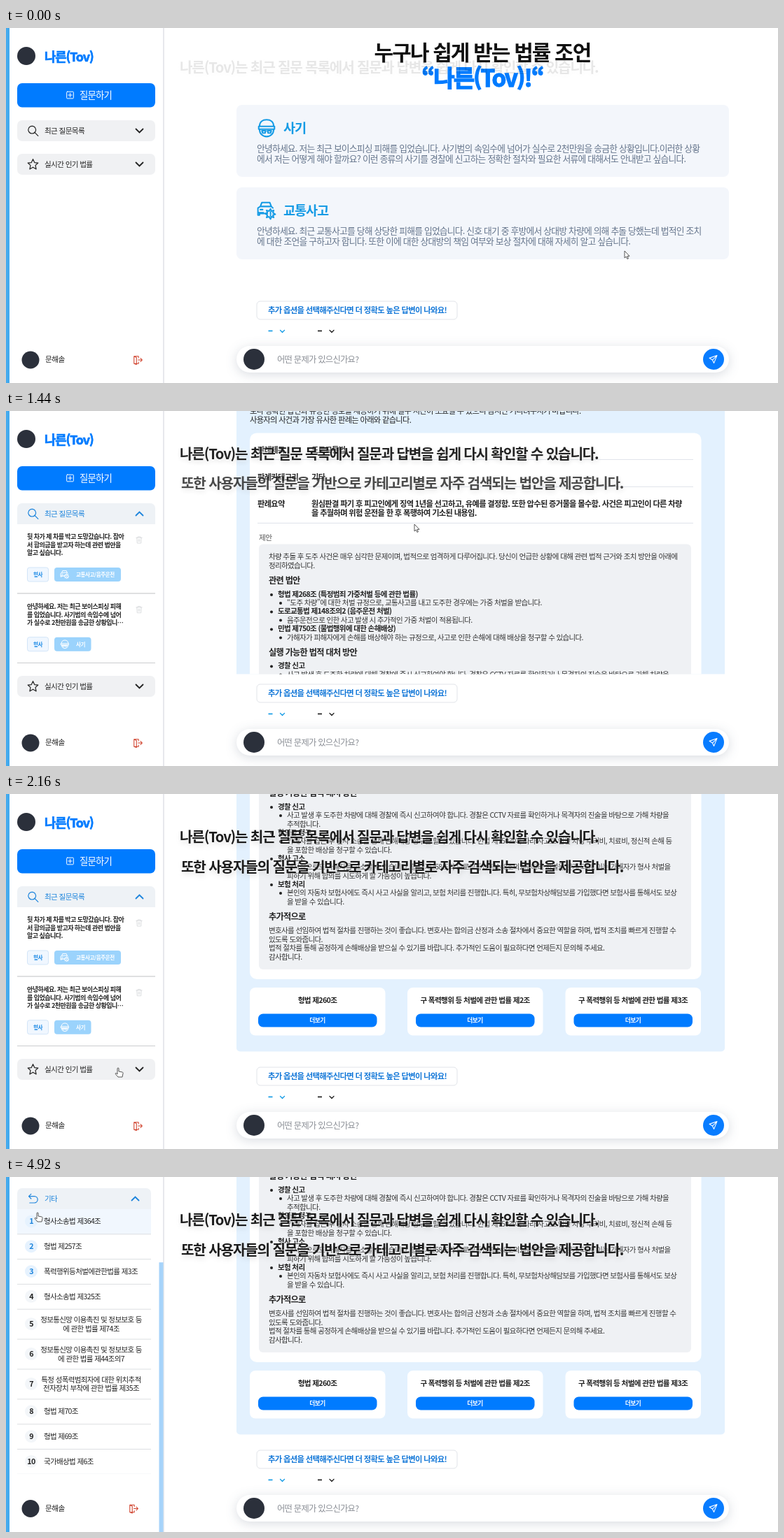
Recreate the animation shown at these times as an HTML page. Size 1102 by 508 pixels, loop 4960 ms.

```html
<!DOCTYPE html>
<html lang="ko">
<head>
<meta charset="utf-8">
<style>
html, body { margin: 0; width: 100%; height: 100%; overflow: hidden; background: #fff; }
body > svg { display: block; font-family: "Noto Sans CJK KR", "Noto Sans KR", "Noto Sans CJK", sans-serif; }
text { letter-spacing: -.06em; white-space: pre; }
.brand { stroke: #007bff; stroke-width: .04em; }
.note { filter: drop-shadow(0 0 2px rgba(255,255,255,.9)) drop-shadow(1px 3px 3px rgba(0,0,0,.1)); }
.pill { filter: drop-shadow(0 3px 8px rgba(30,50,80,.17)); }
</style>
</head>
<body>
<svg id="stage" width="1102" height="508" viewBox="0 0 1102 508"></svg>
<script>
const LOOP = 4960;
const BLUE = '#007bff', SKY = '#159be5', INK = '#222', MASCOT = '#2b303b';
const BRAND = '나른(Tov)', USER = '문해솔';

// y is the visual middle of the line
const text = (x, y, s, size, fill = INK, weight = 400, anchor = 'start') =>
  `<text x="${x}" y="${y + size * .38}" font-size="${size}" fill="${fill}" font-weight="${weight}" text-anchor="${anchor}">${s}</text>`;
const lines = (x, y, step, list, ...rest) => list.map((s, i) => text(x, y + i * step, s, ...rest)).join('');
const brand = (...args) => `<g class="brand" font-size="${args[3]}">${text(...args)}</g>`;
const rect = (x, y, w, h, r, fill, extra = '') =>
  `<rect x="${x}" y="${y}" width="${w}" height="${h}" rx="${r}" fill="${fill}" ${extra}/>`;
const dot = (x, y, r, fill) => `<circle cx="${x}" cy="${y}" r="${r}" fill="${fill}"/>`;
const rule = (x, y, w, color) => rect(x, y - .5, w, 1, 0, color);
const clip = (x, y, w, h, body) => h > 0
  ? `<svg x="${x}" y="${y}" width="${w}" height="${h}" viewBox="${x} ${y} ${w} ${h}">${body}</svg>` : '';
const shift = (dy, body) => `<g transform="translate(0 ${dy})">${body}</g>`;

// Icons live on a 24 by 24 grid
const ICON = {
  plus: 'M5 3h14a2 2 0 0 1 2 2v14a2 2 0 0 1-2 2H5a2 2 0 0 1-2-2V5a2 2 0 0 1 2-2zM12 7v10M7 12h10',
  search: 'M10 2a8 8 0 1 0 .1 0M16 16l7 7',
  star: 'M12 1l3.3 7.3 7.7.8-5.8 5.3 1.7 8-6.9-4.1-6.9 4.1 1.7-8L1 9.1l7.7-.8z',
  trash: 'M3 5h18M8 5V2h8v3M5 5l1 17h12l1-17M10 10v7M14 10v7',
  exit: 'M14 7V3H3v18h11v-4M3 3l6 3v17l-6-2M13 12h10M19 8l4 4-4 4',
  send: 'M22 2L2 9l8 5 4 8zM22 2L10 14',
  back: 'M8 2L3 7l5 5M3 7h12a7 7 0 0 1 0 14H5',
  thief: 'M3 10C3 4 7 1.500 12 1.500S21 4 21 10M2 10h20v3.500H2zM3 13.500c0 6 4 9.500 9 9.500s9-3.500 9-9.500M6 15.500h5l-1 3H7zM13 15.500h5l-1 3h-3z',
  car: 'M13 16H3v2H1V9l3-2 2-5h10l2 5 2 2M4 7h14M4 11h3M2 15h6M17 10l1 3 3-1-1 3 3 2-3 1 1 3-3-1-1 3-2-3-3 1 1-3-3-2 3-1-1-3 3 1zM17 14v3M17 18.5v.5',
  eye: 'M1 12c5-9 17-9 22 0-5 9-17 9-22 0zM12 7a5 5 0 1 0 .1 0M12 10a2 2 0 1 0 .1 0',
  gender: 'M8 7a5 5 0 1 0 .1 0M8 17v6M5 20h6M16 7a5 5 0 1 0 .1 0M19 8l4-5M19 3h4v4',
  glove: 'M6 17V6c0-5 13-5 13 0v6l-2 5zM6 9H3v5l3 3M6 17v5h11v-5M10 10h5',
  pill: 'M3 15L13 4c5-3 9 2 6 6L9 20c-5 4-9-1-6-5zM8 10l6 6M17 15a4 4 0 1 0 .1 0',
  heart: 'M12 22L3 13C-2 6 8 0 12 6c4-6 14 0 9 7zM12 6l-3 4 5 3-3 4',
  people: 'M12 2a3 3 0 1 0 .1 0M8 11c0-4 8-4 8 0M12 11v4M5 15h14M4 16a2 2 0 1 0 .1 0M20 16a2 2 0 1 0 .1 0M1 23c0-4 6-4 6 0zM17 23c0-4 6-4 6 0z',
  money: 'M8 2h7l-2 5h-3zM10 7C2 12 1 22 5 22h11c5 0 3-11-3-15M11 11v8M8 14h5M15 19h8v4h-8z',
  office: 'M4 2h16v20H4zM8 7h3M14 7h3M8 12h3M14 12h3M10 22v-5h4v5',
  more: 'M4 11a1 1 0 1 0 .1 0M12 11a1 1 0 1 0 .1 0M20 11a1 1 0 1 0 .1 0'
};
const icon = (name, x, y, size, color, width = 1.8) =>
  `<path d="${ICON[name]}" transform="translate(${x - size / 2} ${y - size / 2}) scale(${size / 24})" fill="none" stroke="${color}" stroke-width="${width}" stroke-linejoin="round" stroke-linecap="round"/>`;
const chevron = (x, y, r, color, up, width = 1.6) => {
  const d = up ? -r / 2 : r / 2;
  return `<path d="M${x - r} ${y - d}L${x} ${y + d}L${x + r} ${y - d}" fill="none" stroke="${color}" stroke-width="${width}" stroke-linecap="round"/>`;
};

// Timing helpers
const unit = v => Math.max(0, Math.min(1, v));
const ramp = (t, from, to) => { const u = unit((t - from) / (to - from)); return u * u * (3 - 2 * u); };
const easeOut = u => 1 - (1 - unit(u)) ** 2;
function track(keys, t, smooth = true) {
  let i = 1;
  while (i < keys.length - 1 && keys[i][0] < t) i++;
  const [a, ...p] = keys[i - 1], [b, ...q] = keys[i];
  const u = smooth ? ramp(t, a, b) : unit((t - a) / (b - a));
  return p.map((v, k) => v + (q[k] - v) * u);
}

const POINTER = [[0, 883, 319], [60, 883, 319], [560, 172, 151], [800, 172, 151], [980, 150, 190],
  [1160, 150, 190], [1400, 583, 162], [1440, 583, 162], [1840, 569, 162], [1940, 569, 162],
  [2140, 160, 392], [2260, 160, 392], [2600, 104, 300], [3380, 104, 300], [3480, 104, 330],
  [3800, 104, 330], [4020, 104, 271.5], [4160, 104, 271.5], [4500, 80, 404], [4640, 80, 404],
  [4880, 45, 51], [LOOP, 45, 51]];
const CHAT_SCROLL = [[1340, 392], [1440, 347], [1840, 117], [2000, 0], [LOOP, 0]];
const SIDE_SCROLL = [[2900, 0], [3200, 162], [3560, 162], [3840, 0], [4120, 0], [4480, 162], [LOOP, 162]];

const CATEGORIES = [['스토킹', 'eye'], ['성범죄', 'gender'], ['교통사고/음주운전', 'car'], ['폭행/상해', 'glove'],
  ['마약', 'pill'], ['사기', 'thief'], ['이혼', 'heart'], ['상속/가사', 'people'], ['대여금/미수금/채권추심', 'money'],
  ['행정소송', 'office'], ['명예훼손', 'people'], ['기타', 'more']];
const LAWS = ['형사소송법 제364조', '형법 제257조', '폭력행위등처벌에관한법률 제3조', '형사소송법 제325조',
  '정보통신망 이용촉진 및 정보보호 등|에 관한 법률 제74조', '정보통신망 이용촉진 및 정보보호 등|에 관한 법률 제44조의7',
  '특정 성폭력범죄자에 대한 위치추적|전자장치 부착에 관한 법률 제35조', '형법 제70조', '형법 제69조', '국가배상법 제6조'];

function topic(y, name, title, body) {
  return rect(329, y, 703, 103, 8, '#f3f6fb') + icon(name, 372, y + 33, 27, SKY) +
    text(396, y + 33, title, 18.6, SKY, 700) + lines(358, y + 62, 15, body, 12.75, '#64748b');
}

const home = text(680, 34.5, '누구나 쉽게 받는 법률 조언', 29.9, '#111', 700, 'middle') +
  brand(680, 71, `“${BRAND}!“`, 33, BLUE, 900, 'middle') +
  topic(110, 'thief', '사기', [
    '안녕하세요. 저는 최근 보이스피싱 피해를 입었습니다. 사기범의 속임수에 넘어가 실수로 2천만원을 송금한 상황입니다.이러한 상황',
    '에서 저는 어떻게 해야 할까요? 이런 종류의 사기를 경찰에 신고하는 정확한 절차와 필요한 서류에 대해서도 안내받고 싶습니다.']) +
  topic(228, 'car', '교통사고', [
    '안녕하세요. 최근 교통사고를 당해 상당한 피해를 입었습니다. 신호 대기 중 후방에서 상대방 차량에 의해 추돌 당했는데 법적인 조치',
    '에 대한 조언을 구하고자 합니다. 또한 이에 대한 상대방의 책임 여부와 보상 절차에 대해 자세히 알고 싶습니다.']);

const composer = rect(358, 391, 286, 26, 5, '#fff', 'stroke="#e1e4e9"') +
  text(374, 404, '추가 옵션을 선택해주신다면 더 정확도 높은 답변이 나와요!', 11.35, '#1478d8', 700) +
  rect(374.5, 432.6, 6, 1.7, 0, SKY) + chevron(394.5, 434, 3, SKY, false, 1.3) +
  rect(445, 432.6, 6, 1.7, 0, INK) + chevron(465, 434, 3, INK, false, 1.3) +
  rect(329, 455, 703, 38, 19, '#fff', 'class="pill"') + dot(354, 474, 15, MASCOT) +
  text(387, 474, '어떤 문제가 있으신가요?', 12.3, '#8b8f96') +
  dot(1010, 474, 15, '#087cff') + icon('send', 1009.5, 474, 13, '#fff', 2);

const para = (y, ...list) => lines(375, y, 12.4, list, 10.5, '#333');
const head = (y, s) => text(375, y, s, 12.2, INK, 700);
const point = (y, s, ...subs) => dot(379, y + 1, 2, INK) + text(388, y, s, 10.5, INK, 700) +
  dot(392, y + 13, 2, INK) + lines(401, y + 12.3, 12.4, subs, 10.5, '#333');
const fact = (y, label, ...value) => text(359, y, label, 11.25, INK, 700) + lines(436, y, 13.5, value, 11.25, INK, 700);
const lawCard = (x, s) => rect(x, 277, 193.5, 68.5, 8, '#fff') + text(x + 96.5, 294.5, s, 10.6, INK, 700, 'middle') +
  rect(x + 12, 314.5, 169.5, 19, 7, BLUE) + text(x + 96.5, 324, '더보기', 8.7, '#fff', 700, 'middle');

const answer = rect(329, -372, 697, 740.5, 5, '#e3f1fe') +
  lines(348, -347, 13, ['보다 정확한 답변과 유용한 정보를 제공하기 위해 일부 시간이 소요될 수 있으니 잠시만 기다려주시기 바랍니다.',
    '사용자의 사건과 가장 유사한 판례는 아래와 같습니다.'], 11.25, INK, 500) +
  rect(348, -315, 644.5, 580, 10, '#fff') +
  fact(-291, '판례제목', '도로교통법') + fact(-252, '판례카테고리', '기타') +
  fact(-214, '판례요약', '원심판결 파기 후 피고인에게 징역 1년을 선고하고, 유예를 결정함. 또한 압수된 증거물을 몰수함. 사건은 피고인이 다른 차량',
    '을 추월하며 위험 운전을 한 후 폭행하여 기소된 내용임.') +
  [-277, -238, -186].map(y => rule(359, y, 622, '#dfe4ea')).join('') +
  text(361, -166, '제안', 10.7, '#555') + rect(361, -156, 617, 407, 6, '#eff1f4') +
  para(-138, '차량 추돌 후 도주 사건은 매우 심각한 문제이며, 법적으로 엄격하게 다루어집니다. 당신이 언급한 상황에 대해 관련 법적 근거와 조치 방안을 아래에', '정리하였습니다.') +
  head(-104, '관련 법안') +
  point(-84.5, '형법 제268조 (특정범죄 가중처벌 등에 관한 법률)', '“도주 차량”에 대한 처벌 규정으로, 교통사고를 내고 도주한 경우에는 가중 처벌을 받습니다.') +
  point(-60, '도로교통법 제148조의2 (음주운전 처벌)', '음주운전으로 인한 사고 발생 시 추가적인 가중 처벌이 적용됩니다.') +
  point(-35, '민법 제750조 (불법행위에 대한 손해배상)', '가해자가 피해자에게 손해를 배상해야 하는 규정으로, 사고로 인한 손해에 대해 배상을 청구할 수 있습니다.') +
  head(-1.5, '실행 가능한 법적 대처 방안') +
  point(18, '경찰 신고', '사고 발생 후 도주한 차량에 대해 경찰에 즉시 신고하여야 합니다. 경찰은 CCTV 자료를 확인하거나 목격자의 진술을 바탕으로 가해 차량을', '추적합니다.') +
  point(55, '합의금 청구', '가해자를 잡은 후 민사 소송을 통해 손해배상 청구를 할 수 있습니다. 민법 제750조에 따라 사고로 인한 차량 수리비, 치료비, 정신적 손해 등', '을 포함한 배상을 청구할 수 있습니다.') +
  point(92, '형사 고소', '형사적으로도 가해자를 고소할 수 있습니다. 형법 제268조와 도로교통법 제148조의2에 따라 처벌을 받게 되며, 이는 가해자가 형사 처벌을', '피하기 위해 합의를 시도하게 할 가능성이 높습니다.') +
  point(129, '보험 처리', '본인의 자동차 보험사에도 즉시 사고 사실을 알리고, 보험 처리를 진행합니다. 특히, 무보험차상해담보를 가입했다면 보험사를 통해서도 보상', '을 받을 수 있습니다.') +
  head(175, '추가적으로') +
  para(195.5, '변호사를 선임하여 법적 절차를 진행하는 것이 좋습니다. 변호사는 합의금 산정과 소송 절차에서 중요한 역할을 하며, 법적 조치를 빠르게 진행할 수', '있도록 도와줍니다.',
    '법적 절차를 통해 공정하게 손해배상을 받으실 수 있기를 바랍니다. 추가적인 도움이 필요하다면 언제든지 문의해 주세요.', '감사합니다.') +
  lawCard(348, '형법 제260조') + lawCard(573, '구 폭력행위 등 처벌에 관한 법률 제2조') + lawCard(798.5, '구 폭력행위 등 처벌에 관한 법률 제3조');

function question(y, body, name, tag, tagWidth) {
  return lines(30, y, 11.4, body, 9, INK, 700) + icon('trash', 190, y + 4.5, 11, '#d5d7da') +
    rect(30.5, y + 44, 30, 20, 3, '#f0f7ff', 'stroke="#d3e5f8"') + text(45.5, y + 54, '형사', 7.6, '#1e8be6', 700, 'middle') +
    rect(69, y + 44, tagWidth, 20, 4, '#9bd3fc') + icon(name, 84, y + 54, 13, '#fff') + text(100, y + 54, tag, 7.6, '#fff', 700) +
    rule(16, y + 81, 197, '#bfc1c4');
}
const recent = question(180, ['뒷 차가 제 차를 박고 도망갔습니다. 잡아', '서 합의금을 받고자 하는데 관련 법안을', '알고 싶습니다.'], 'car', '교통사고/음주운전', 95) +
  question(279.7, ['안녕하세요. 저는 최근 보이스피싱 피해', '를 입었습니다. 사기범의 속임수에 넘어', '가 실수로 2천만원을 송금한 상황입니⋯'], 'thief', '사기', 52.5);

function header(y, w, name, label, open) {
  const bg = open ? '#eef2f6' : '#f0f1f3', color = open ? '#1c84dc' : INK;
  return rect(16, y - 15, w, 30, 7, bg) + (open ? rect(16, y, w, 15, 0, bg) : '') +
    icon(name, 38.5, y, 16, color) + text(55, y, label, 10.6, color) + chevron(w - 6.5, y, 5, color, open, 1.8);
}

function categoryRows(hoverY) {
  const h = 31.45;
  return CATEGORIES.map(([s, name], i) => {
    const y = 210 + i * h, over = hoverY >= y && hoverY < y + h;
    return (over ? rect(16, y, 191, h, 0, '#f2f8fe') : '') + icon(name, 38.5, y + 15.5, 16, '#2b95d8', 1.6) +
      text(55, y + 15.5, s, 10.6, INK, 500) + rule(16, y + h, 191, '#dcdfe2');
  }).join('');
}

function lawRows(hoverY) {
  let y = 210;
  return LAWS.map((s, i) => {
    const part = s.split('|'), two = part.length > 1, h = two ? 42.9 : 35.8, c = y + h / 2 - .5;
    const over = hoverY >= y && hoverY < y + h;
    const row = (over ? rect(16, y, 191, h, 0, '#f1f7fe') : '') + dot(36, c, 9, i < 3 ? '#e6f2fe' : '#f3f6f9') +
      text(36, c, i + 1, 10.7, i < 3 ? '#1c84dc' : INK, 700, 'middle') +
      (two ? lines(121.5, c - 6, 12.5, part, 10.5, INK, 500, 'middle') : text(54, c, s, 10.5, INK, 500)) +
      rule(16, y + h, 191, '#dcdfe2');
    y += h;
    return row;
  }).join('');
}

function sidebar(t, hoverY) {
  const showRecent = ramp(t, 600, 740) * (1 - ramp(t, 2240, 2360));
  const showPopular = ramp(t, 2240, 2400);
  const detail = t >= 4580, narrow = showPopular > 0;
  const w = narrow ? 191 : 197, dx = narrow ? -3 : 0;
  const scroll = detail ? 164 : track(SIDE_SCROLL, t)[0];
  const drop = 199 * showRecent, listH = 379 * showPopular;
  const userY = Math.max(475, 210 + drop + listH + 49.5);
  const rows = detail ? lawRows(hoverY + scroll) : categoryRows(t > 2420 ? hoverY + scroll : 0);
  const body = dot(29, 40, 13, MASCOT) + brand(55, 41, BRAND, 17.8, BLUE, 900) +
    rect(16, 79, w, 34.5, 7, BLUE) + icon('plus', 91.5 + dx, 96, 13, '#fff') + text(105 + dx, 96, '질문하기', 13.4, '#fff', 500) +
    header(147, w, 'search', '최근 질문목록', showRecent > 0) + clip(0, 162, 225, 199 * showRecent, recent) +
    shift(drop, header(195, w, detail ? 'back' : 'star', detail ? '기타' : '실시간 인기 법률', narrow) + clip(0, 210, 225, listH, rows)) +
    dot(35, userY, 12.5, MASCOT) + text(56, userY - 1, USER, 10.7) + icon('exit', 188 + 2 * dx, userY, 14, '#d0402b');
  return shift(-scroll, body) + (narrow ? rect(218.5, scroll * .745, 6, 386, 0, '#a6d3fa') : '');
}

const arrow = '<path d="M0 0v10l2.4-2 1.5 3.5 1.6-.7-1.5-3.4h3z" fill="#fff" stroke="#444" stroke-width=".9"/>';
const hand = '<path d="M-1 1c0-1.5 2-1.5 2 0v4l5 1c1 .3 1.3 1 1 2l-1 5h-6l-3.5-4c-1-1.5.5-2 1.2-1.3l1.3 1.3z" fill="#fff" stroke="#444" stroke-width=".9"/>';

function note(x, y, s, u) {
  const p = easeOut(u);
  return `<g class="note" opacity="${p}">${text(x, y - 6 * (1 - p), s, 20.2, '#1c1c1c', 700)}</g>`;
}

const stage = document.getElementById('stage');
stage.innerHTML = rect(0, 0, 5, 508, 0, '#43aaee') + rect(224.5, 0, 1, 508, 0, '#cfd2dc') +
  `<g id="home">${home}</g><svg id="chat" x="329" y="0" width="697" height="376.5" viewBox="329 0 697 376.5"><g id="answer">${answer}</g></svg>` +
  composer + '<g id="notes"></g><g id="side"></g><g id="pointer"></g>';
const parts = Object.fromEntries(['home', 'chat', 'answer', 'notes', 'side', 'pointer']
  .map(id => [id, document.getElementById(id)]));

function draw(t) {
  const chatting = t >= 1080;
  const [x, y] = track(POINTER, t);
  parts.home.style.display = chatting ? 'none' : '';
  parts.chat.style.display = chatting ? '' : 'none';
  parts.answer.setAttribute('transform', `translate(0 ${track(CHAT_SCROLL, t, false)[0]})`);
  parts.notes.innerHTML = note(248, 61.5, `${BRAND}는 최근 질문 목록에서 질문과 답변을 쉽게 다시 확인할 수 있습니다.`, (t + 100) / 1900) +
    note(250, 104.5, '또한 사용자들의 질문을 기반으로 카테고리별로 자주 검색되는 법안을 제공합니다.', (t - 400) / 1900);
  parts.side.innerHTML = sidebar(t, y);
  const pressing = (t > 520 && t < 1200) || (t > 2100 && t < 2300) || t > 4460;
  parts.pointer.innerHTML = pressing ? hand : arrow;
  parts.pointer.setAttribute('transform', `translate(${x} ${y})`);
}

const start = performance.now();
function tick() {
  draw((performance.now() - start) % LOOP);
  requestAnimationFrame(tick);
}
tick();
</script>
</body>
</html>
```
